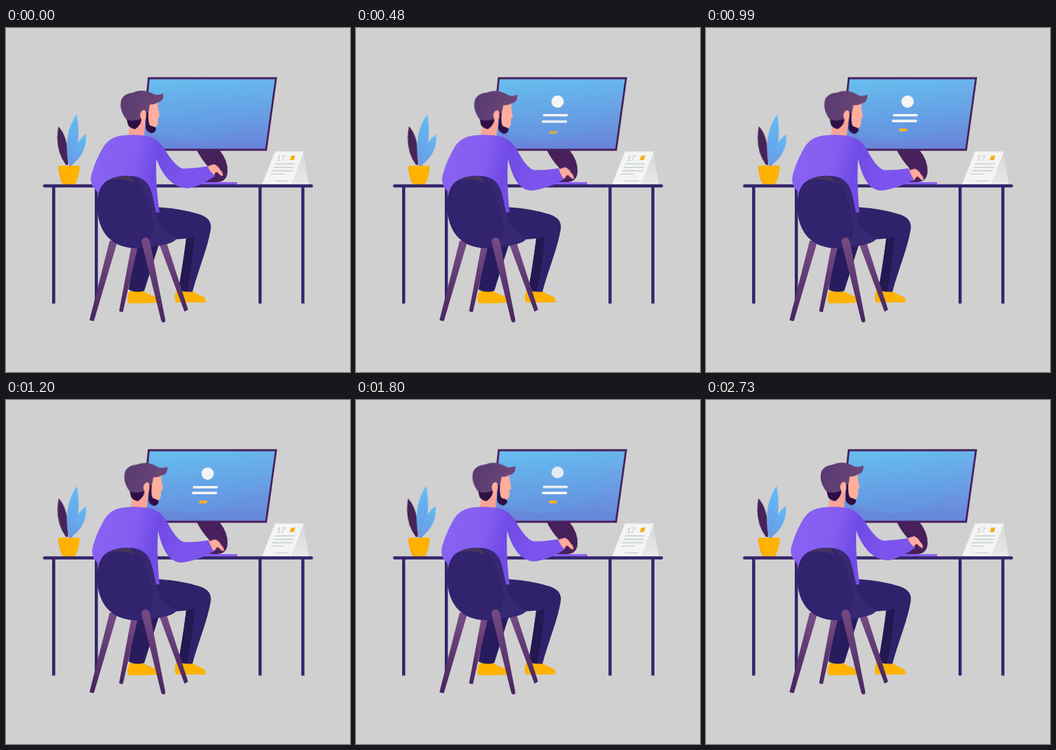
Write an HTML page that moves like this. It is 500 px wide and 500 px high and loops after 2760 ms.

```html
<!DOCTYPE html>
<html lang="en">
<head>
<meta charset="utf-8">
<title>Working at the desk</title>
<style>
html, body { margin: 0; width: 100%; height: 100%; overflow: hidden; background: #d0d0d0; }
svg { display: block; width: 100%; height: 100%; }

.head, .hand, .torso, .leaf, .item { animation: 2760ms ease-in-out infinite both; }

.head { transform-origin: 190px 235px; animation-name: lean; }
@keyframes lean {
  0%, 76.1%, 100% { transform: rotate(0deg); }
  19.6%, 54.3% { transform: rotate(2.5deg); }
}

.hand { animation-name: type; }
@keyframes type {
  0%, 76.1%, 100% { transform: translate(0, 0); }
  19.6%, 44%, 54.3% { transform: translate(1.5px, 4.5px); }
  36% { transform: translate(1px, 6.5px); }
}

.torso { animation-name: reach; }
@keyframes reach {
  0%, 76.1%, 100% { d: path("M172 156Q188 154 205 157Q220 160 231 177Q247 203 258 204.500Q276 204 293 201Q297 210 304 215Q284 229 266 233Q248 233 235 219Q225 208 218.500 190Q217 225 223 268L150 270L131 236Q120 226 124.500 212Q130 192 142 172Q152 157 172 156Z"); }
  19.6%, 54.3% { d: path("M174 156Q190 154 208 157Q224 160 234 177Q248 204 259 206.500Q276 207 294 204Q297 212 302 220Q282 232 258 236Q242 238 232 221Q225 209 221 190Q219 225 223 268L150 270L132 236Q122 226 126.500 212Q132 192 144 172Q154 157 174 156Z"); }
}

.leaf { transform-origin: 92px 202px; animation-name: sway; }
@keyframes sway {
  0%, 50%, 100% { transform: rotate(.2deg); }
  0%, 50% { animation-timing-function: ease-out; }
  25% { transform: rotate(1.1deg); animation-timing-function: ease-in; }
  75% { transform: rotate(-.6deg); animation-timing-function: ease-in; }
}

.item { transform-box: fill-box; transform-origin: center; animation-name: show; animation-delay: calc(var(--i) * 53ms); }
@keyframes show {
  0%, 7.25% { opacity: 0; transform: translateY(14px); animation-timing-function: ease-out; }
  15.2% { opacity: 1; transform: none; }
  61.6% { opacity: 1; transform: none; animation-timing-function: ease-in; }
  74.6%, 100% { opacity: 0; transform: translateY(-15px) scaleY(.5); }
}
</style>
</head>
<body>
<svg viewBox="0 0 500 500">
  <defs>
    <linearGradient id="screen" x2="0" y2="1"><stop stop-color="#6ab8ee"/><stop offset="1" stop-color="#6882d8"/></linearGradient>
    <linearGradient id="glow" x2=".15" y2="1"><stop stop-color="#69c2f4"/><stop offset=".35" stop-color="#67b9ee"/><stop offset="1" stop-color="#6494e0"/></linearGradient>
    <linearGradient id="shirt" x2="1" y2=".15"><stop stop-color="#8a63f2"/><stop offset=".4" stop-color="#835df0"/><stop offset=".56" stop-color="#704ae6"/><stop offset=".8" stop-color="#7c53ec"/></linearGradient>
    <linearGradient id="hair" x2="1" y2=".2"><stop stop-color="#563a72"/><stop offset="1" stop-color="#6c4676"/></linearGradient>
    <linearGradient id="blue" x2="0" y2="1"><stop stop-color="#60bdf6"/><stop offset="1" stop-color="#6c98e4"/></linearGradient>
    <linearGradient id="wood" x2="0" y2="1"><stop stop-color="#764b84"/><stop offset="1" stop-color="#482660"/></linearGradient>
    <linearGradient id="side" x2="0" y2="1"><stop stop-color="#d6d7d8"/><stop offset="1" stop-color="#e8eaea"/></linearGradient>
    <clipPath id="display"><path d="M208 73H392L378 177H197Z"/></clipPath>
  </defs>

  <!-- monitor -->
  <path fill="#48205c" d="M277 177H310Q323 193 322 209Q321 224 306 224H286Q300 215 295 203Q284 191 277 177Z"/>
  <path fill="#8a5ef2" d="M278 224H336V228H272Z"/>
  <g clip-path="url(#display)">
    <path fill="url(#screen)" d="M190 70H400V180H190Z"/>
    <ellipse cx="270" cy="104" rx="98" ry="60" fill="url(#glow)"/>
  </g>
  <path fill="none" stroke="#48205c" stroke-width="2.800" d="M207.500 73H392.500L378 177H197Z"/>
  <g fill="#f4f4f4">
    <ellipse class="item" style="--i:0" cx="293" cy="107" rx="9" ry="9"/>
    <rect class="item" style="--i:1" x="271.500" y="125" width="36.500" height="3.600" rx="1.800"/>
    <rect class="item" style="--i:2" x="270" y="133.300" width="37" height="3.600" rx="1.800"/>
    <path class="item" style="--i:3" fill="#f9b020" d="M281.500 146H292.500L291.500 150.300H280.500Z"/>
  </g>

  <!-- plant -->
  <path class="leaf" fill="#472458" d="M76 143Q92 160 90 199H87Q70 176 76 143Z"/>
  <path class="leaf" fill="url(#blue)" d="M102.500 125Q110 165 96 200H91Q82 155 102.500 125Z"/>
  <path class="leaf" fill="url(#blue)" d="M116 154Q118 183 94 200Q97 168 116 154Z"/>
  <path fill="#ffb300" d="M77.500 200H105.500Q107.500 200 107 203Q106 217 101 226Q100 228 98 228H86Q83 228 82 226Q77 216 76 203Q75.500 200 77.500 200Z"/>
  <path fill="#ffaa05" d="M77.500 201Q81 218 90 228H86Q83 228 82 226Q77 216 76 203Q76 201 77.500 201Z"/>

  <!-- calendar -->
  <path fill="url(#side)" d="M432 179L440 228H412Z"/>
  <path fill="#f3f4f4" d="M391 179.500H433L414.500 227.500H372Z"/>
  <text transform="translate(392.500 192.500) skewX(-16)" font-family="Lato, sans-serif" font-size="10.500" fill="#bcbfc2">17</text>
  <path fill="#f9ae16" d="M414.500 185.500H420.500L418.500 192H412.500Z"/>
  <path fill="none" stroke="#c8cccf" stroke-width="1.300" d="M391 197.500H420M389 202.500H418.500M387 207.500H417M385 212.300H404M391 222.300H411"/>

  <!-- desk -->
  <g fill="none" stroke="#33246c" stroke-width="4.500">
    <path stroke-linecap="round" d="M56 229.500H444"/>
    <path d="M69.300 230V400.500M131.300 230V395M369.300 230V400.500M431.500 230V400.500"/>
  </g>

  <!-- legs and shoes -->
  <g fill="#ffb300">
    <path d="M180 382H199Q209 388 217 390.500Q220.500 394 220 399Q200 401 178 400Q174 392 180 382Z"/>
    <path d="M248 381H269Q279 388 287 390.500Q291 394 290 399H247Q243 391 248 381Z"/>
  </g>
  <path fill="#281c5e" d="M190 312H223L201 382Q189 386 178 380Z"/>
  <path fill="#30226a" d="M212 259L223 260.500Q258 263 282 271Q300 277 297.500 293C293 320 280 350 271 383.500Q260 384 250.500 381Q257 345 262 306L212 310Z"/>
  <path fill="#231852" d="M262 306L274 304Q271 345 263 383.500L250.500 381Q257 345 262 306Z"/>

  <!-- person -->
  <g class="head">
    <path fill="#f9a497" d="M180 140L197 125H203L201 157Q190 160 178 157Z"/>
    <path fill="#ffae9d" d="M204 110L220.500 107Q220 114 221.500 119L223.500 128L221 130L221 137Q220.500 143 217 144.500H207Z"/>
    <path fill="#2e0f46" d="M175 130L197 128Q198 140 188 147Q180 146 177.500 141Q176 136 175 130Z"/>
    <path fill="#2e0f46" d="M203.500 121H207Q206 139 210 142Q215 143 218 145Q218.500 151 212 153Q204 151 203 145Z"/>
    <path fill="url(#hair)" d="M175 133Q163 118 168 103Q173 95 184 94Q196 88.500 208 93L217 97Q223 98 228.500 95Q230 106 221 108Q214 112 209 111Q208 118 207 123H203Q196 124 196 132Q185 137 175 133Z"/>
    <path fill="#ffae9d" d="M195 125Q197 118 202 119.500Q205 124 203 132L200 138Q195 132 195 125Z"/>
  </g>
  <path class="hand" fill="#ffaa9c" d="M289 203Q297 199 303 198Q309 201 311 206Q316 210 315 215Q312 215 307 209.500L304 210Q304 216 295 215Z"/>
  <path class="torso" fill="url(#shirt)" d="M172 156Q188 154 205 157Q220 160 231 177Q247 203 258 204.500Q276 204 293 201Q297 210 304 215Q284 229 266 233Q248 233 235 219Q225 208 218.500 190Q217 225 223 268L150 270L131 236Q120 226 124.500 212Q130 192 142 172Q152 157 172 156Z"/>

  <!-- chair -->
  <g fill="url(#wood)" stroke="url(#wood)" stroke-width="2" stroke-linejoin="round">
    <path d="M151.500 310H161L127 425L122.500 424Z"/>
    <path d="M183 318H190.500L169 412L165.500 411Z"/>
    <path d="M224.500 316L233 314L263.500 409L260 411Z"/>
  </g>
  <path fill="#31236e" d="M132.500 258C132.500 240 138 227 147 222C160 214 178 213 192 217C205 221 210 232 213.500 247C217 262 218 275 226 288Q234 299 248 306Q243 312 233 314Q207 321 184 320C152 317 133 296 132.500 258Z"/>
  <path fill="#372873" d="M183 215Q206 218 211 238C217 262 218 275 226 288Q234 299 248 306Q243 312 233 314L207 318Q221 290 207 257Q201 229 183 215Z"/>
  <path fill="#46325f" d="M147 222Q162 214 180 215Q185 219 188 225Q166 217 147 222Z"/>
  <path fill="url(#wood)" d="M197 311Q197 305 203 304.500Q208 305 209 310L231.500 424Q232 427.500 229 428Q226.500 428 225.500 425Z"/>
</svg>
</body>
</html>
```
